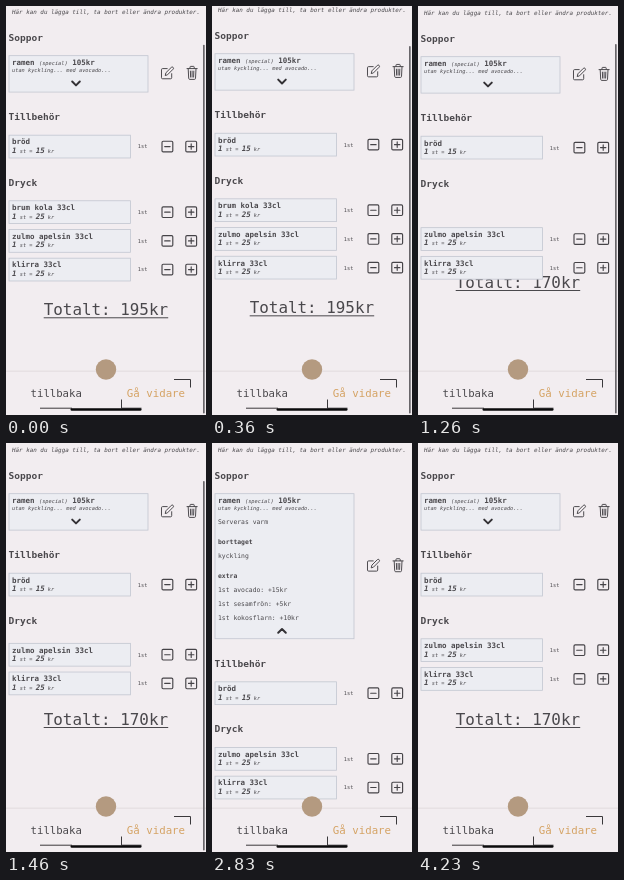
Animation, 200 px wide and 409 px high, one loop 4730 ms. Source, as an HTML page:

```html
<!DOCTYPE html>
<html lang="sv">
<head>
<meta charset="utf-8">
<title>Beställning</title>
<style>
  html, body { margin: 0; width: 100%; height: 100%; overflow: hidden; background: #f2edf0; }
  svg { display: block; width: 100%; height: 100%; }
  text { font-family: "DejaVu Sans Mono", monospace; fill: #4a484c; white-space: pre; }
  .b { font-weight: bold; }
  .i { font-style: italic; }
  .head { font-size: 9.5px; font-weight: bold; }
  .name { font-size: 7.47px; font-weight: bold; }
  .small { font-size: 5.3px; font-weight: normal; }
  .more { font-size: 6.4px; }
  .box { fill: #ecedf2; stroke: #c2c6d0; stroke-width: .8; }
  .icon { fill: none; stroke: #454347; stroke-width: 1.15; stroke-linecap: round; stroke-linejoin: round; }
  .thin { stroke-width: .95; }
  .edge { fill: none; stroke: #3a383b; stroke-width: 1; }
</style>
</head>
<body>
<svg viewBox="0 0 200 409" preserveAspectRatio="none">
  <defs>
    <clipPath id="clip"><rect id="clipRect" x="3" y="70" width="139" height="0"/></clipPath>
    <g id="steps" class="icon">
      <rect x="156" y="-5.3" width="10.8" height="10.6" rx="1.2"/>
      <path d="M158.7 0h5.4"/>
      <rect x="179.8" y="-5.3" width="10.8" height="10.6" rx="1.2"/>
      <path d="M182.5 0h5.4M185.2-2.7v5.4"/>
    </g>
  </defs>
  <rect width="200" height="409" fill="#f2edf0"/>

  <g id="page">
    <text class="i" x="6" y="8.9" font-size="5.9">Här kan du lägga till, ta bort eller ändra produkter.</text>
    <text class="head" x="2.6" y="35.9">Soppor</text>
    <rect id="soup" class="box" x="3" y="50.7" width="139" height="36.4"/>
    <text class="name" x="6" y="59.8">ramen <tspan class="small i b">(special)</tspan> 105kr</text>
    <text class="small i" x="6" y="66.8">utan kyckling... med avocado...</text>
    <g id="details" clip-path="url(#clip)"></g>
    <path id="arrow" fill="none" stroke="#333135" stroke-width="2" stroke-linecap="round" stroke-linejoin="round"/>
    <g id="tools" class="icon thin">
      <path d="M161.2-4.4h-4.6a1.1 1.1 0 0 0-1.1 1.1v8a1.1 1.1 0 0 0 1.1 1.1h8a1.1 1.1 0 0 0 1.1-1.1V.7"/>
      <path d="M159.3 2.2l.6-2.4 5.4-5.4a1.2 1.2 0 0 1 1.8 1.8L161.7 1.6z"/>
      <path d="M181-4.4h10.2M184-4.6v-1.3q0-.7.7-.7h2.8q.7 0 .7.7v1.3M182.2-4.2l.5 9.6q.1 1 1 1h4.8q.9 0 1-1l.5-9.6M184.4-1.9l.2 6M186.1-1.9v6M187.8-1.9l-.2 6"/>
    </g>

    <g id="below">
      <text class="head" x="2.6" y="115">Tillbehör</text>
      <text class="head" x="2.6" y="180.6">Dryck</text>
      <g id="total">
        <text x="37.7" y="310.3" font-size="15.9" id="sum"></text>
        <rect x="37.7" y="312.3" width="124.5" height="1" fill="#4a484c"/>
      </g>
    </g>
  </g>

  <rect y="365.5" width="200" height="43.5" fill="#f2edf0"/>
  <rect y="364.5" width="200" height="1.5" fill="#e7e1e4"/>
  <circle cx="100" cy="363.5" r="10.2" fill="#b49a80"/>
  <text x="24.6" y="391.4" font-size="10.65">tillbaka</text>
  <text x="120.8" y="391.4" font-size="10.75" style="fill:#d5a364">Gå vidare</text>
  <path class="edge" d="M168 373.5h16.5v8M115.5 393.5v8.7h20M34 402.2h32"/>
  <rect x="64.5" y="402.2" width="71" height="2.5" rx="1.25" fill="#0b0b0c"/>
  <rect id="bar" x="197" width="1.7" rx=".8" fill="#69666a"/>
</svg>
<script>
const LOOP = 4730, OPEN = 116, PITCH = 28.7;
const $ = id => document.getElementById(id);
const NS = "http://www.w3.org/2000/svg";

function addGroup(parent, html) {
  const g = document.createElementNS(NS, "g");
  g.innerHTML = html;
  parent.appendChild(g);
  return g;
}

function addRow(name, price) {
  return addGroup($("below"), `
    <rect class="box" x="3" y="-11.4" width="121.5" height="22.8"/>
    <text class="name" x="6" y="-2.1">${name}</text>
    <text class="name i" x="6" y="6.4">1<tspan class="small"> st = </tspan>${price}<tspan class="small"> kr</tspan></text>
    <text class="small" x="131.8" y="1.9">1st</text>
    <use href="#steps"/>`);
}

const rows = [["bröd", 15], ["brum kola 33cl", 25], ["zulmo apelsin 33cl", 25], ["klirra 33cl", 25]]
  .map(r => addRow(...r));

[["Serveras varm", 81], ["borttaget", 100.6, "b"], ["kyckling", 114.7], ["extra", 134.6, "b"],
 ["1st avocado: +15kr", 148.8], ["1st sesamfrön: +5kr", 162.8], ["1st kokosflarn: +10kr", 176.8]]
  .forEach(([s, y, c = ""]) => addGroup($("details"), `<text class="more ${c}" x="6" y="${y}">${s}</text>`));

const clamp = v => Math.max(0, Math.min(1, v));
const move = (el, y) => el.setAttribute("transform", `translate(0 ${y.toFixed(2)})`);

// cubic-bezier(.25, .1, .25, 1)
function ease(x) {
  x = clamp(x);
  let lo = 0, hi = 1;
  for (let i = 0; i < 22; i++) {
    const u = (lo + hi) / 2, v = 1 - u;
    if (.75 * v * u + u * u * u < x) lo = u; else hi = u;
  }
  const v = 1 - lo;
  return .3 * v * v * lo + 3 * v * lo * lo + lo ** 3;
}

// damped bounce at the end of the page
function overscroll(t) {
  const s = t / 1000;
  return t < 660 ? (.6 + 434 * s) * Math.exp(-11 * s) : 0;
}

const panelHeight = t => OPEN * (ease((t - 2610) / 320) - ease((t - 3490) / 500));

function draw(t) {
  const off = overscroll(t), h = panelHeight(t);
  move($("page"), -off);

  $("soup").setAttribute("height", 36.4 + h);
  $("clipRect").setAttribute("height", h);
  move($("tools"), 68 + h / 2);
  const up = t >= 2630 && t < 3510;
  $("arrow").setAttribute("d", up ? "M66.2 81.1l3.8-3.8 3.8 3.8" : "M66.2 76.6l3.8 3.8 3.8-3.8");
  move($("arrow"), h);
  move($("below"), h);

  const removed = t >= 1255;
  const slide = removed ? PITCH * (1 - clamp((t - 1245) / 470)) ** 3 : PITCH;
  rows[1].style.display = removed ? "none" : "";
  move(rows[0], 141.6);
  move(rows[1], 207.2);
  move(rows[2], 207.2 + slide);
  move(rows[3], 207.2 + PITCH + slide);
  move($("total"), removed ? -28.3 : 0);
  $("sum").textContent = removed ? "Totalt: 170kr" : "Totalt: 195kr";

  const top = 38 + off * .7;
  $("bar").setAttribute("y", top);
  $("bar").setAttribute("height", 407.5 - top);
  $("bar").setAttribute("opacity", 1 - clamp((t - 2280) / 150));
}

const start = performance.now();
function tick() {
  draw((performance.now() - start) % LOOP);
  requestAnimationFrame(tick);
}
tick();
</script>
</body>
</html>
```
